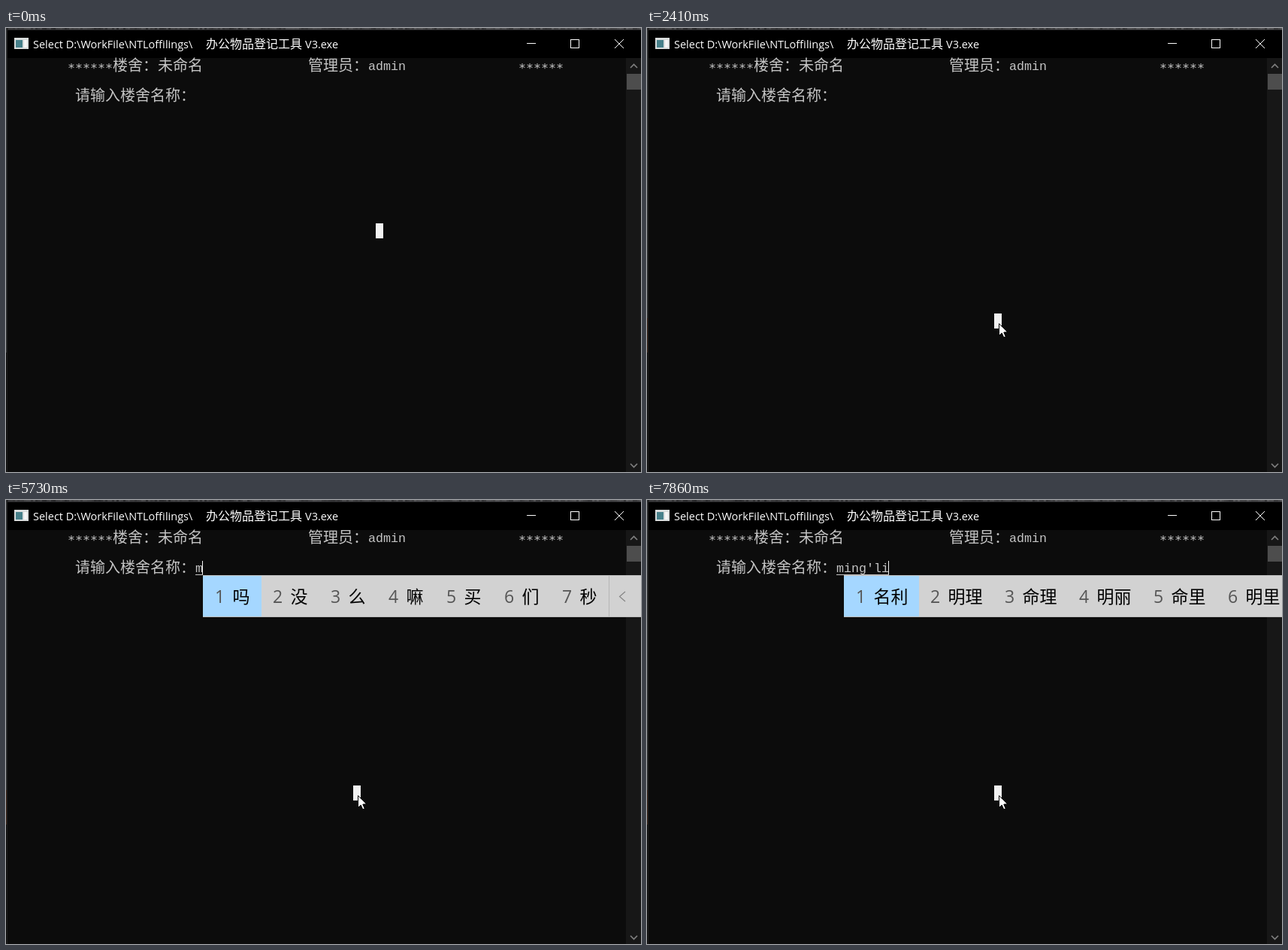
Animation, 845 px wide and 591 px high, one loop 8 s. Source, as an HTML page with a canvas:

```html
<!DOCTYPE html>
<html lang="zh-CN">
<head>
<meta charset="utf-8">
<style>
  html, body { margin: 0; overflow: hidden; background: #0c0c0c; }
  canvas { display: block; }
</style>
</head>
<body>
<canvas id="stage" width="845" height="591"></canvas>
<script>
const ctx = document.getElementById("stage").getContext("2d");
const LOOP = 8000;
const CJK = '"Noto Sans CJK SC", "Noto Sans CJK", sans-serif';
const TITLE_FONT = '14.5px "Open Sans", ' + CJK;
const TITLE_CJK = "16px " + CJK;
const CONSOLE_CJK = "300 20px " + CJK;
const CONSOLE_LATIN = '16.67px "Liberation Mono", monospace';
const STAR_FONT = '16.6px "DejaVu Sans Mono", monospace';
const CONSOLE_COLOR = "#c4c4c4";
const INPUT_X = 252;

// Input method states: start time, typed letters, candidates
const TYPING = [
  [5730, "m", "吗 没 么 嘛 买 们 秒"],
  [6000, "m'l", "美丽 目录 马路 命令 魅力 明亮"],
  [6660, "m", "吗 没 么 嘛 买 们 秒"],
  [7000, "mi", "米 密 迷 秘 蜜 觅 眯"],
  [7130, "min", "民 敏 闽 皿 悯 抿 闵"],
  [7330, "ming", "名 明 命 鸣 铭 冥 茗"],
  [7660, "ming'l", "命令 明亮 名列 明朗 名流 名录"],
  [7860, "ming'li", "名利 明理 命理 明丽 命里 明里"]
];
const CARET_TOGGLES = [2950, 3480, 3940, 4470, 5000, 5530];

function rect(x, y, w, h, color) {
  ctx.fillStyle = color;
  ctx.fillRect(x, y, w, h);
}

function text(str, x, y, font, color) {
  ctx.font = font;
  ctx.fillStyle = color;
  ctx.fillText(str, x, y);
}

function line(points, color, width = 1) {
  ctx.beginPath();
  points.forEach(([x, y]) => ctx.lineTo(x, y));
  ctx.strokeStyle = color;
  ctx.lineWidth = width;
  ctx.stroke();
}

function drawDesktopEdge(t) {
  rect(0, 0, 845, 591, "#0c0c0c");
  rect(0, 0, 845, 3, "#29292b");
  for (let x = 0; x < 845; x += 3) {
    const noise = Math.abs(Math.sin(x * 12.9898) * 43758.5453) % 1;
    const shade = 36 + Math.floor(noise * 38 + x / 40);
    rect(x, 0, 3, 2, `rgb(${shade},${shade},${shade + 2})`);
  }
  rect(0, 0, 1, 432, "#303234");
  rect(1, 0, 1, 591, "#1d1d1d");
  if (t >= 260 && t < 1320) rect(0, 300, 1, 95, "#3a2820");
  if (t >= 1320) rect(0, 386, 1, 46, "#3c2418");
}

function drawTitleBar(active) {
  const color = active ? "#ffffff" : "#808080";
  rect(2, 3, 843, 37, active ? "#000000" : "#2b2b2b");

  rect(11, 13, 19, 15, "#d9dddd");
  rect(13, 16, 9, 10, "#47808a");
  rect(24, 16, 4, 10, "#f6f6f6");

  text("Select D:\\WorkFile\\NTLoffilings\\", 36, 27, TITLE_FONT, color);
  text("办公物品登记工具", 266, 27, TITLE_CJK, color);
  text("V3.exe", 398, 27, TITLE_FONT, color);

  line([[693, 20.5], [705, 20.5]], color);
  ctx.strokeRect(751.5, 15.5, 11, 11);
  line([[810, 15], [822, 27]], color);
  line([[822, 15], [810, 27]], color);
}

function drawScrollbar() {
  rect(825, 40, 20, 551, "#171717");
  rect(826, 61, 19, 21, "#4d4d4d");
  line([[831, 53], [835.5, 48.5], [840, 53]], "#808080", 1.6);
  line([[831, 580], [835.5, 584.5], [840, 580]], "#808080", 1.6);
}

function drawConsoleText() {
  const stars = x => text("******", x, 59, STAR_FONT, CONSOLE_COLOR);
  stars(82);
  text("楼舍：未命名", 142, 57, CONSOLE_CJK, CONSOLE_COLOR);
  text("管理员：", 402, 57, CONSOLE_CJK, CONSOLE_COLOR);
  text("admin", 482, 56, CONSOLE_LATIN, CONSOLE_COLOR);
  stars(682);
  text("请输入楼舍名称：", 92, 97, CONSOLE_CJK, CONSOLE_COLOR);
}

function drawPointer(x, y) {
  const outline = [[0, 0], [0, 16], [3.7, 12.6], [6.3, 18.4], [8.8, 17.3], [6.3, 11.6], [11.3, 11.3]];
  ctx.beginPath();
  outline.forEach(([dx, dy]) => ctx.lineTo(x + dx, y + dy));
  ctx.closePath();
  ctx.fillStyle = "#ffffff";
  ctx.fill();
  ctx.strokeStyle = "#000000";
  ctx.lineWidth = 1;
  ctx.stroke();
}

function drawCandidates(words) {
  const single = words[0].length === 1;
  const pitch = single ? 77 : 99;
  rect(262, 100, 583, 56, "#d2d2d2");
  rect(262, 100, 583, 1, "#bdbdbd");
  rect(262, 155, 583, 1, "#bdbdbd");
  rect(262, 101, pitch + 1, 54, "#a5d7ff");
  words.forEach((word, i) => {
    const x = 278 + i * pitch;
    text(i + 1, x, 137, '23px "Open Sans", sans-serif', "#555555");
    text(word, x + 23.5, 137, "23px " + CJK, "#000000");
  });
  if (single) {
    rect(802, 101, 1, 54, "#b5b5b5");
    line([[824, 122], [816.5, 128.5], [824, 135]], "#858585", 1.2);
  }
}

function drawInput(t) {
  const state = TYPING.findLast(([start]) => t >= start);
  if (!state) {
    const toggles = CARET_TOGGLES.filter(time => t >= time).length;
    if (toggles % 2) rect(INPUT_X, 95, 10, 5, "#f2f2f2");
    return;
  }
  const [, letters, candidates] = state;
  const width = letters.length * 10;
  text(letters, INPUT_X, 96, CONSOLE_LATIN, CONSOLE_COLOR);
  rect(INPUT_X, 99, width, 1, CONSOLE_COLOR);
  rect(INPUT_X + width - 1, 81, 1, 18, "#f2f2f2");
  drawCandidates(candidates.split(" "));
}

function draw(now) {
  const t = now % LOOP;
  const moved = t >= 2410;
  drawDesktopEdge(t);
  drawTitleBar(t < 260 || t >= 1320);
  drawScrollbar();
  drawConsoleText();
  rect(moved ? 462 : 492, moved ? 380 : 260, 10, 20, "#f2f2f2");
  if (moved) drawPointer(468.5, 393.5);
  drawInput(t);
  requestAnimationFrame(draw);
}
requestAnimationFrame(draw);
</script>
</body>
</html>
```
